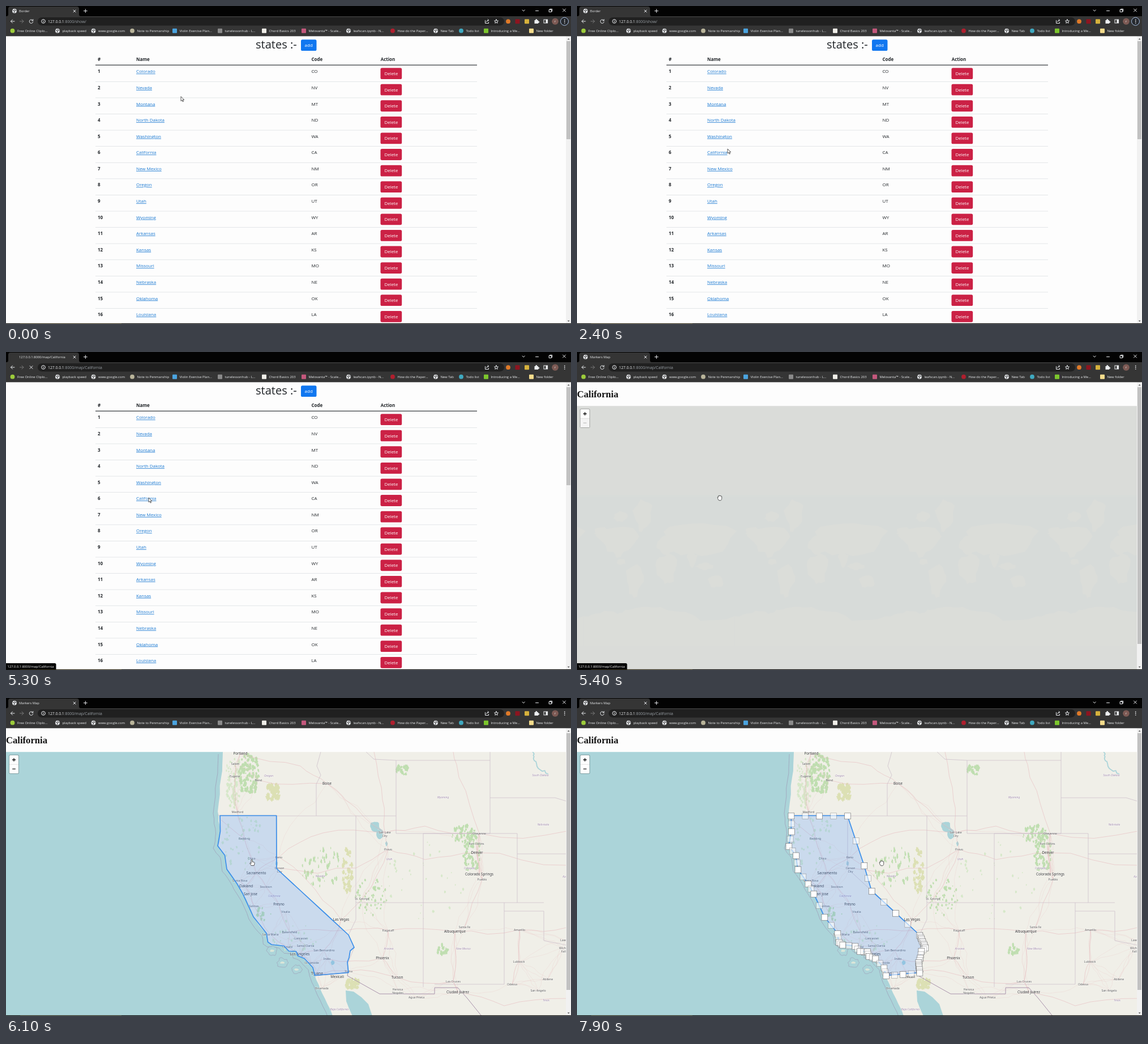
An HTML page that plays this animation: 998 px wide and 561 px high, repeating every 8 s.

```html
<!DOCTYPE html>
<html lang="en">
<head>
<meta charset="utf-8">
<title>State map</title>
<style>
html, body { margin: 0; width: 100%; height: 100%; overflow: hidden; background: #fdfdfd; }
svg { display: block; width: 100%; height: 100%; }
text { font-family: "Open Sans", "Noto Sans", sans-serif; white-space: pre; }
.label { font-family: "Noto Sans", "Open Sans", sans-serif; text-anchor: middle; paint-order: stroke; stroke: #fff; stroke-opacity: .6; stroke-width: 1; }
.icon { fill: none; stroke: #e8eaed; stroke-width: 1; stroke-linecap: round; stroke-linejoin: round; }
</style>
</head>
<body>
<svg id="stage" viewBox="0 0 998 561"></svg>
<script>
const LOOP = 8000, STEP = 100;
const stage = document.getElementById('stage');

// Markup helpers
const text = (x, y, s, size, fill, more = '') => `<text x="${x}" y="${y}" font-size="${size}" fill="${fill}" ${more}>${s}</text>`;
const rect = (x, y, w, h, fill, more = '') => `<rect x="${x}" y="${y}" width="${w}" height="${h}" fill="${fill}" ${more}/>`;
const dot = (x, y, r, fill, more = '') => `<circle cx="${x}" cy="${y}" r="${r}" fill="${fill}" ${more}/>`;
const path = (d, fill, more = '') => `<path d="${d}" fill="${fill}" ${more}/>`;
const line = (d, color, w, more = '') => path(d, 'none', `stroke="${color}" stroke-width="${w}" stroke-linejoin="round" ${more}`);
const icon = (d, more = '') => `<path class="icon" d="${d}" ${more}/>`;
const group = (id, body, more = '') => `<g id="${id}" ${more}>${body}</g>`;
const mid = 'text-anchor="middle"';

// Shape helpers
function randomizer(seed) {
  return () => {
    seed = (seed * 1664525 + 1013904223) >>> 0;
    return seed / 4294967296;
  };
}
const rnd = randomizer(11);
const jitter = size => (rnd() - .5) * 2 * size;
const trace = points => 'M' + points.map(p => p.map(v => v.toFixed(1)).join(' ')).join('L');

// Roughens a line by shifting the middle of every segment sideways
function wander(points, amount, depth = 2) {
  if (!depth) return points;
  const out = [points[0]];
  for (let i = 1; i < points.length; i++) {
    const [[ax, ay], [bx, by]] = [points[i - 1], points[i]], k = jitter(amount);
    out.push([(ax + bx) / 2 + (by - ay) * k, (ay + by) / 2 - (bx - ax) * k], points[i]);
  }
  return wander(out, amount, depth - 1);
}

// Ragged oval that may narrow towards the bottom
function blob(cx, cy, rx, ry, taper = 0, rough = .2) {
  const ring = [];
  for (let a = 0; a < 6.28; a += .35) {
    const r = 1 + jitter(rough), s = Math.sin(a);
    ring.push([cx + Math.cos(a) * rx * r * (1 - taper * s), cy + s * ry * r]);
  }
  return trace(ring) + 'Z';
}

// Browser frame
const globe = (x, y) => dot(x, y, 3.9, '#e8eaed') +
  path(`M${x - 2.8} ${y - 1.5}l2.2 1.2.8 2-1.4 1.2M${x + .4} ${y - 3}l.4 1.8 2.4 .6`, 'none', 'stroke="#444" stroke-width="1.1"');
const square = (x, y, fill) => rect(x - 4, y - 4, 8, 8, fill, 'rx="1"');
const disc = (x, y, fill) => dot(x, y, 3.9, fill);

function bookmarks() {
  const y = 43.7;
  const items = [
    [11.5, 'Free Online Cliplo...', disc, '#9ccb3b'],
    [91, 'playback speed', globe],
    [154.5, 'www.google.com', globe],
    [223, 'Note to Penmanship', disc, '#b9b49a'],
    [298, 'Violin Exercise Plan...', square, '#4aa3df'],
    [378, 'tunelessonhub - L...', square, '#8b8b8b'],
    [456, 'Chord Basics 203', square, '#f0eee8'],
    [526, 'Melovanta™ - Scale...', square, '#c4587c'],
    [605, 'leafscan.ipynb - N...', globe],
    [683, 'How do the Paper...', disc, '#b01f2e'],
    [759, 'New Tab', globe],
    [804, 'Todo list', disc, '#3fa9c0'],
    [848, 'Introducing a Me...', square, '#7cc62d'],
    [928, 'New folder', square, '#f5dc8c']
  ];
  return items.map(([x, name, mark, fill]) => mark(x, y, fill) + text(x + 8.4, 45.8, name, 5.93, '#eceef0')).join('');
}

function frame() {
  return rect(0, 0, 998, 53.3, '#353535') + rect(0, 0, 998, 18, '#030303') +
    path('M1 18Q4 18 4 15V5Q4 1 8 1H125Q129 1 129 5V15Q129 18 132 18Z', '#353535') +
    group('tabIcon', globe(15, 8.7)) + text(23, 10.8, '', 5.82, '#eceef0', 'id="tabTitle"') +
    icon('M119 7l4 4M123 7l-4 4M137.3 8.7h6m-3-3v6M912 7l2.2 2 2.2-2M935.5 8.5h5M959.5 6.5h4v4h-4zM960.5 5.3h4.2v4M983.5 5l5 5m0-5l-5 5', 'stroke-width=".9"') +
    icon('M15 27H8.5m3-3l-3 3 3 3') + icon('M24.5 27H31m-3-3l3 3-3 3', 'style="stroke:#777"') +
    group('reload', icon('M47.4 25.5A3.3 3.3 0 1 0 47.8 28M47.8 23.6v2.3h-2.3')) +
    group('stop', icon('M42 24.5l5 5m0-5l-5 5')) +
    rect(56, 20, 824, 14.4, '#202020', 'rx="7.2"') +
    icon('M66 26.6v2M66 25v.1M69.4 27a3.4 3.4 0 1 0-6.8 0a3.4 3.4 0 1 0 6.8 0', 'stroke-width=".8"') +
    `<text x="74" y="29.5" font-size="6.81" fill="#eceef0">127.0.0.1<tspan fill="#9aa0a6" id="url"></tspan></text>` +
    icon('M846.5 25.5v5h6v-2M848.5 28q.5-3 4-3m-1.5-1.5l1.7 1.5-1.7 1.5M866 23.6l1 2.4 2.5.2-1.9 1.6.6 2.5-2.2-1.4-2.2 1.4.6-2.5-1.9-1.6 2.5-.2z', 'stroke-width=".8"') +
    disc(887, 27.2, '#e07a28') + square(903.5, 27.2, '#8d1420') + square(920, 27.2, '#d6b23c') +
    path('M933.5 25h2a1.4 1.4 0 1 1 2.6 0h2v2a1.4 1.4 0 1 1 0 2.4v1.6h-6.6z', '#eceef0') +
    rect(950, 24, 6.6, 6, 'none', 'stroke="#eceef0"') + rect(953.5, 24, 3, 6, '#eceef0') +
    dot(970, 27.2, 5.8, '#7d5a54') + text(970, 29.2, 'r', 6, '#eee', mid) +
    group('ring', dot(986.5, 27.2, 7, '#26292e', 'stroke="#a9c3e8"')) +
    [-1, 0, 1].map(i => dot(986.7, 27.2 + i * 2.8, .85, '#eceef0')).join('') +
    bookmarks();
}

function scrollbar() {
  return rect(989, 53.3, 9, 507, '#f1f1f1') + rect(990, 62, 7, 173, '#c1c1c1', 'id="thumb"') +
    path('M991.7 59.2h4l-2-2.2zM991.7 554.8h4l-2 2.2z', '#555');
}

// List of states
function listPage() {
  const rows = ('Colorado CO,Nevada NV,Montana MT,North Dakota ND,Washington WA,California CA,New Mexico NM,Oregon OR,' +
    'Utah UT,Wyoming WY,Arkansas AR,Kansas KS,Missouri MO,Nebraska NE,Oklahoma OK,Louisiana LA').split(',');
  const ink = '#212529', size = 7.95, bold = 'font-weight="700"';
  const columns = { '#': 162, Name: 230, Code: 539.5, Action: 661.7 };
  let out = text(441, 74.7, 'states :-', 20.1, ink, 'font-weight="500"') +
    rect(521, 59.3, 27.5, 19.8, '#1077f0', 'rx="2.6"') + text(534.7, 72, 'add', size, '#fff', mid);
  for (const name in columns) out += text(columns[name], 96.7, name, size, ink, bold);
  out += rect(158, 103.6, 674, 1.2, '#303438');
  rows.forEach((row, i) => {
    const y = 118.4 + i * 28.58;
    out += text(columns['#'], y, i + 1, size, ink, bold) +
      text(columns.Name, y, row.slice(0, -3), size, '#1878d2', 'text-decoration="underline"') +
      text(columns.Code, y, row.slice(-2), size, ink) +
      rect(661.5, y - 9.2, 37.7, 19.8, '#cb2145', 'rx="2.6"') + text(680.4, y + 3.6, 'Delete', size, '#fff', mid);
    if (i < rows.length - 1) out += rect(158, y + 14.6, 674, .7, '#d9dde0');
  });
  return out;
}

const water = '#abd4d9', soil = '#f0efe8';

// Whole world, repeated sideways
function worldMap() {
  const size = 267;
  const land = blob(62, 82, 34, 26, .45) + blob(34, 66, 16, 8) + blob(67, 118, 8, 5) +
    blob(90, 153, 15, 29, .5) + blob(105, 38, 16, 26, .3) + blob(66, 38, 12, 9) +
    blob(200, 76, 60, 32, .2) + blob(145, 88, 16, 16) + blob(192, 115, 8, 13, .6) + blob(214, 126, 14, 6) +
    blob(146, 132, 20, 27, .4) + blob(233, 153, 14, 10) +
    trace(wander([[0, 214], [60, 210], [90, 200], [150, 204], [size, 214]], .15, 3)) + `V${size}H0Z`;
  let out = rect(0, 252, 989, size, water);
  for (let x = 11.5 - size; x < 989; x += size) out += path(land, soil, `transform="translate(${x} 252)"`);
  return out;
}

// Outline corners; "/n" splits the way to the next corner into n equal parts
const corners = ('378 207.5/2,477.7 207.5,478 301/3,605 418/4,615 440,608 446,606 458,603 466/3,605 484.5/2,545.5 489.5,542 475.5,' +
  '527 459.5,515.5 455,512.5 447,499.5 446.5,491 437.5,469 435,462.5 430.5,460 415,437 386,418 345,408 327.5,390 302,386.5 277.5,374 261,378.5 235')
  .split(',').map(s => s.split(/[ \/]/).map(Number));
const outline = corners.flatMap(([x, y, n = 1], i) => {
  const [nx, ny] = corners[(i + 1) % corners.length];
  return Array.from({ length: n }, (_, k) => [x + (nx - x) * k / n, y + (ny - y) * k / n]);
});
const dragged = 3;

// Places as "name x y"; a bar breaks the label
const readPlaces = list => Object.fromEntries(list.split(',').map(s => {
  const [, name, x, y] = s.match(/(.+) (\d+) (\d+)$/);
  return [name, [+x, +y]];
}));
const bigCities = readPlaces('Portland 414 98,Boise 567 151,Denver 832 273,Colorado Springs 836 311,Sacramento 442 309,Oakland 424 332,San Jose 432 346,' +
  'Fresno 482 364,Las Vegas 592 391,Los Angeles 519 452,Tijuana 549 486,Mexicali 585 492,Phoenix 665 459,Tucson 691 493,Ciudad Juárez 798 519,Albuquerque 793 412');
const towns = readPlaces('Salem 405 116,Eugene 404 138,Bend 446 145,Medford 409 201,Salt Lake|City 669 237,Provo 675 267,Cheyenne 836 239,Fort Collins 831 257,' +
  'Pueblo 841 320,Redding 421 248,Chico 434 283,Reno 482 281,Carson|City 483 300,Santa Rosa 413 322,Stockton 459 333,Salinas 438 367,Visalia 494 377,' +
  'St. George 629 354,Santa Maria 467 417,Bakersfield 501 413,Lancaster 521 424,Santa Clarita 529 437,Oxnard 497 439,San Bernardino 562 445,Oceanside 540 467,' +
  'Indio 567 460,Yuma 605 482,Ensenada 558 512,Flagstaff 675 410,Heroica|Nogales 692 514,Agua Prieta 725 528,Las Cruces 790 500,Santa Fe 810 404,' +
  'Amarillo 907 409,Lubbock 906 465,Odessa 894 505,Abilene 957 496,San Angelo 940 516,Lawton 988 427,Wichita|Falls 986 441');
const states = readPlaces('Oregon 464 137,Wyoming 772 175,South Dakota 944 136,Nebraska 949 223,Utah 677 284,Colorado 819 300,Kansas 991 315,' +
  'California 474 349,Nevada 555 314,Arizona 676 442,New Mexico 808 442,Texas 954 533,Baja California 589 549');
const cities = { ...bigCities, ...towns };

// Main roads run from place to place
const routes = [
  'Portland>Salem>Eugene>Medford>Redding>Sacramento>Stockton>Fresno>Bakersfield>Santa Clarita>Los Angeles>Oceanside>Tijuana',
  'Oakland>Sacramento>Reno>560 238>Salt Lake|City>740 226>Cheyenne>990 235',
  'Los Angeles>San Bernardino>Las Vegas>St. George>Provo>Salt Lake|City>665 180>650 95',
  'Portland>520 120>Boise>600 180>Salt Lake|City',
  'San Bernardino>Indio>Phoenix>Tucson>Las Cruces>Ciudad Juárez>880 543>990 530',
  'Bakersfield>600 410>Flagstaff>Albuquerque>Amarillo>990 405',
  'Ciudad Juárez>Las Cruces>Albuquerque>Santa Fe>Pueblo>Colorado Springs>Denver>Cheyenne>800 140>790 95',
  'Provo>740 285>Denver>990 295', 'Las Vegas>530 320>Reno', 'Carson|City>618 300>Provo', 'Phoenix>Flagstaff',
  'Redding>380 215', 'Santa Rosa>San Jose>Salinas>Santa Maria>Oxnard>Los Angeles', 'Tijuana>Yuma>Tucson', 'Bend>Boise', 'Amarillo>Lubbock>Odessa'
];

function roads() {
  const main = routes.map(r => trace(wander(r.split('>').map(p => cities[p] || p.split(' ').map(Number)), .07))).join('');
  const all = Object.values(cities);
  const minor = all.map(([x, y]) => {
    const near = all.slice().sort((a, b) => Math.hypot(a[0] - x, a[1] - y) - Math.hypot(b[0] - x, b[1] - y)).slice(2, 5);
    return near.map(p => trace(wander([[x, y], p], .1, 3))).join('');
  }).join('');
  return line(minor, '#e9c4c4', .45, 'opacity=".6"') + line(main, '#e3abb1', .55, 'opacity=".85"');
}

const labels = (places, size, fill, more = '') => Object.entries(places).map(([name, [x, y]]) =>
  name.split('|').map((s, i) => text(x, y + size * .36 + i * 6, s, size, fill, `class="label" ${more}`)).join('')).join('');

// Seeded scatter of woodland, optionally as slanted streaks
function patch(cx, cy, rx, ry, n, fill, size = 2, tilt = 0) {
  let d = '';
  for (let i = 0; i < n; i++) {
    const a = rnd() * 6.283, r = Math.sqrt(rnd()), s = size * (.5 + rnd());
    d += blob(cx + Math.cos(a) * r * rx, cy + Math.sin(a) * r * ry, s * .7, s * (tilt ? 2 : 1), tilt, .35);
  }
  return path(d, fill);
}

function stateMap() {
  const green = '#bfdeb0', pale = '#d6e8c9', olive = '#dce0b4';
  const borders = 'M374 207H478V301L605 418 618 391V208M478 208H689M548 208V152L556 136 549 120 556 95M689 239V110H855V239H689M855 110V95M689 110L650 108 636 95' +
    'M855 176H970L990 182M737 239H903V361M903 275H990M618 361H950M737 239V510M880 361V376H950V428L990 436M880 376V505H757M605 418L615 440 603 470 604 484';
  const national = 'M546 490L604 484 603 490 660 522H757V511H798L815 530 840 561';
  // The shore follows the western side of the outline
  const west = outline.slice(outline.findIndex(p => p[0] === 545.5)).reverse();
  const shore = wander([[383, 95], [380, 140], [374, 200], ...west, [558, 520], [577, 561]], .05);
  const limit = shore.map(([x, y]) => [x - 8, y + 4]);
  const islands = [[470, 446], [488, 467], [513, 479]];
  return rect(0, 95, 989, 466, water) +
    path(trace(shore) + 'H612L606 548 601 535 600 516 614 518 628 528 640 540 647 561H990V95Z', soil) +
    patch(430, 135, 19, 38, 130, green, 2.6) + patch(402, 145, 14, 50, 90, pale, 2.2) + patch(470, 166, 13, 16, 34, olive, 3.6) +
    patch(420, 255, 38, 50, 50, pale, 2) + patch(455, 380, 14, 14, 16, green, 2.2) + patch(510, 420, 40, 34, 30, pale, 2) +
    patch(556, 296, 36, 36, 60, green, 1.7, -.3) + patch(603, 304, 9, 42, 50, olive, 3) + patch(645, 350, 28, 34, 60, green, 1.8) +
    patch(808, 240, 22, 16, 50, green, 2.4) + patch(823, 274, 15, 38, 80, green, 2.4) + patch(700, 127, 11, 10, 30, green, 2.4) +
    patch(770, 443, 11, 9, 24, green, 2.2) + patch(740, 320, 80, 70, 34, pale, 1.8) + patch(612, 504, 13, 9, 34, olive, 3) +
    path(blob(652, 227, 8, 9) + blob(660, 239, 6, 9) + blob(672, 257, 2, 4) + blob(478, 292, 2, 4) + blob(577, 467, 3, 4), water) +
    line(trace(wander([[930, 95], [936, 112], [958, 134]], .3, 3)), water, 1.8) +
    roads() + line(borders, '#c9bac8', .7) + line(national, '#a892ab', 1) +
    line(trace(limit), '#9b95b2', .8, 'opacity=".8"') +
    islands.map(([x, y]) => path(blob(x, y, 9, 8), water, 'stroke="#9b95b2" stroke-width=".7" stroke-opacity=".8"') + path(blob(x, y, 4, 2), '#dbe6d9')).join('') +
    labels(states, 4.9, '#9d86a8', 'font-style="italic"') + labels(towns, 5.15, '#555') + labels(bigCities, 6.2, '#333');
}

function mapPage() {
  return rect(0, 95, 989, 466, '#dadcd9') + group('world', worldMap()) + group('states', stateMap()) +
    `<path id="area" fill="#3388ff" fill-opacity=".2" stroke="#3b8fea" stroke-width="1.7" stroke-linejoin="round"/>` + group('handles', '') +
    rect(0, 53.3, 989, 41.9, '#fdfdfd') +
    text(0, 79.7, 'California', 16.64, '#111', `style="font-family:'Liberation Serif',serif" font-weight="700"`) +
    rect(5, 100, 18, 34, '#000', 'rx="2.5" opacity=".25"') + rect(6, 101, 16, 32, '#fff', 'rx="1.5"') +
    rect(6, 117, 16, 16, '#f4f4f4', 'id="minusBox"') + rect(6, 116.8, 16, .6, '#ccc') +
    line('M11 109h6m-3-3v6', '#111', 1.3) + line('M11.2 125.2h5.6', '#111', 1.2, 'id="minus"');
}

const cursors = {
  arrow: 'M0 0V8L1.9 6.3 3.2 9.2 4.5 8.6 3.2 5.8H5.7Z',
  hand: 'M0 0C.9 0 1 .8 1 1.5V4L4.2 4.7C5 4.9 5.2 5.5 5.1 6.2L4.6 9.2 4 10.6H-.6L-3.1 7C-3.5 6.1-2.8 5.6-2 6.1L-1 7V1.5C-1 .6-.8 0 0 0Z',
  grab: 'M-3.8-.5c0-1 1.2-1 1.4-.2V-2.8c0-1 1.4-1 1.4 0 0-1.4 1.6-1.4 1.7 0 .1-1 1.5-1 1.5 .3 .3-.6 1.5-.4 1.5 .5V1.5C3.7 3 2.8 4.5 1.8 4.8H-1.3C-2.4 4-3 2.5-3.8-.5Z'
};

stage.innerHTML = rect(0, 0, 998, 561, '#fdfdfd') + group('list', listPage()) + group('map', mapPage()) + scrollbar() + frame() +
  group('status', path('M0 549H86Q88.5 549 88.5 551.5V560H0Z', '#050505') + text(2.6, 556.8, '127.0.0.1:8000/map/California', 5.82, '#f2f2f2')) +
  rect(0, 559.8, 998, 1.2, '#0c0c0a') + rect(25, 560.3, 179, .7, '#4a3f22') +
  '<path id="cursor" fill="#fff" stroke="#222" stroke-width=".75" stroke-linejoin="round"/>';

const ui = {};
stage.querySelectorAll('[id]').forEach(el => ui[el.id] = el);
const show = (el, on) => el.setAttribute('display', on ? 'inline' : 'none');
const set = (el, attrs) => Object.entries(attrs).forEach(([k, v]) => el.setAttribute(k, v));

// Motion
const ramp = (t, from, to) => Math.min(1, Math.max(0, (t - from) / (to - from)));
const ease = u => u * u * (3 - 2 * u);
const mix = (a, b, u) => a.map((v, i) => v + (b[i] - v) * u);

// Each move: start, end, destination
const moves = [
  [1700, 2400, [266, 252]],
  [2500, 3300, [252, 257]],
  [5500, 6100, [434, 285]],
  [6700, 7600, [478, 301]],
  [7600, 7900, [538, 291]]
];
const pointerAt = t => moves.reduce((p, [from, to, goal]) => mix(p, goal, ease(ramp(t, from, to))), [309, 159.7]);

function handles(points) {
  const marks = points.flatMap((p, i) => [[...p, 1], [...mix(p, points[(i + 1) % points.length], .5), .6]]);
  return marks.sort((a, b) => a[1] - b[1])
    .map(([x, y, o]) => rect(x - 5, y - 4.6, 10.8, 10.8, '#fff', `stroke="#666" stroke-width=".6" opacity="${o}"`)).join('');
}

function cursorKind(t, x) {
  if (t < 2600) return 'arrow';
  if (t < 5200) return 'hand';
  if (t < 5400) return 'arrow';
  return x < 376 || t >= 7800 ? 'grab' : 'hand';
}

function draw(t) {
  const onMap = t >= 5400, loading = t >= 5000 && !onMap, zoomed = t >= 5800;
  show(ui.list, !onMap);
  show(ui.map, onMap);
  show(ui.tabIcon, !loading);
  show(ui.reload, !loading);
  show(ui.stop, loading);
  show(ui.ring, t < 5000);
  show(ui.status, t >= 2600 && t < 5900);
  ui.tabTitle.textContent = onMap ? 'Markers Map' : loading ? '127.0.0.1:8000/map/California' : 'Border';
  ui.url.textContent = t >= 5000 ? ':8000/map/California' : ':8000/show/';
  set(ui.thumb, { height: onMap ? 453 : 173 });

  set(ui.world, { opacity: zoomed ? 0 : Math.max(.05, ramp(t, 5400, 5600)) });
  set(ui.states, { opacity: ramp(t, 5700, 6000) });
  show(ui.minusBox, !zoomed);
  set(ui.minus, { stroke: zoomed ? '#111' : '#bbb' });

  const points = outline.slice();
  points[dragged] = mix(points[dragged], [507, 295], ramp(t, 7600, 7900) ** 2);
  show(ui.area, t >= 5900);
  set(ui.area, { d: trace(points) + 'Z' });
  ui.handles.innerHTML = t >= 6800 ? handles(points) : '';

  const [x, y] = pointerAt(t);
  set(ui.cursor, { d: cursors[cursorKind(t, x)], transform: `translate(${x} ${y})` });
}

let shown = -1;
function tick(now) {
  const t = Math.floor(now % LOOP / STEP) * STEP;
  if (t !== shown) draw(shown = t);
  requestAnimationFrame(tick);
}
draw(0);
requestAnimationFrame(tick);
</script>
</body>
</html>
```
